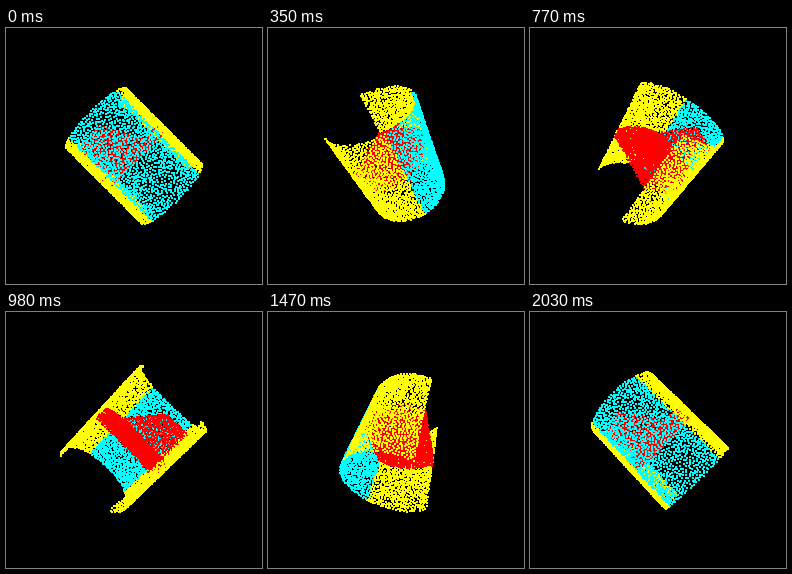
Recreate the animation shown at these times as a matplotlib script. Size 256 by 256 pixels, loop 2100 ms.

```python
import numpy as np
import matplotlib.pyplot as plt
from matplotlib.animation import FuncAnimation

SIZE, FRAMES, STEP_MS = 256, 30, 70
CAMERA = 222                        # viewing distance in pixels
WIDE, DEEP, MID = 42.5, 43, -6      # cross-section of the shell
FRONT = -33                         # depth of the open side
EDGE = np.arccos((FRONT - MID) / DEEP)
BACK = np.radians(45)
CYAN, YELLOW, RED = (0, 1, 1), (1, 1, 0), (1, 0, 0)

rng = np.random.default_rng(5)


def uniform_pair(n):
    return rng.random((2, n))


def thin_out(pts, n):
    """Keep n evenly spaced points, always taking the farthest one next."""
    keep = np.zeros(n, int)
    gap = np.full(len(pts), np.inf)
    for i in range(1, n):
        diff = pts - pts[keep[i - 1]]
        gap = np.minimum(gap, np.einsum("ij,ij->i", diff, diff))
        keep[i] = gap.argmax()
    return keep


def place(a, b, z):
    """Turn axis / across / depth into x, y, z."""
    a, b, z = np.broadcast_arrays(a, b, z)
    return np.column_stack([(a + b) / np.sqrt(2), (b - a) / np.sqrt(2), z])


def shell(n):
    u, v = uniform_pair(4 * n)
    t = (2 * u - 1) * EDGE
    half = 53.5 - 1.5 * np.cos(t)
    pts = place((2 * v - 1) * half, WIDE * np.sin(t), MID + DEEP * np.cos(t))
    keep = thin_out(pts, n)
    rgb = np.where(np.abs(t)[:, None] < BACK, CYAN, YELLOW)
    return pts[keep], rgb[keep]


def seat(n, a):
    u, v = uniform_pair(n)
    z = FRONT + 59 * v
    half = 0.95 * WIDE * np.sqrt(1 - ((z - MID) / DEEP) ** 2)
    return place(a, (2 * u - 1) * half, z)


def front_bar(n):
    u, v = uniform_pair(n)
    return place((2 * v - 1) * 5.5, (2 * u - 1) * 33, FRONT)


def slope(n):
    u, v = uniform_pair(n)[:, :, None]
    near = (1 - u) * np.array([-5, 22, -25]) + u * np.array([-5, -34, -25])
    far = (1 - u) * np.array([-42, -3, 22]) + u * np.array([-41, -33, 14])
    return place(*((1 - v) * near + v * far).T)


wall, wall_rgb = shell(3900)
red = np.vstack([seat(2800, -4), seat(2800, 4), front_bar(700), slope(1900)])
red = red[thin_out(red, 2100)]
points = np.vstack([wall, red])
colors = np.vstack([wall_rgb, np.tile(RED, (len(red), 1))]).astype(float)


def project(angle):
    x, y, z = points.T
    c, s = np.cos(angle), np.sin(angle)
    depth = z * c - x * s
    scale = CAMERA / (CAMERA - depth)
    xy = SIZE / 2 + np.column_stack([(x * c + z * s) * scale, y * scale])
    order = np.argsort(depth)
    return xy[order], colors[order]


fig = plt.figure(figsize=(SIZE / 100, SIZE / 100), dpi=100, facecolor="black")
ax = fig.add_axes([0, 0, 1, 1])
ax.set(xlim=(0, SIZE), ylim=(0, SIZE))
ax.axis("off")
xy, rgb = project(0)
dots = ax.scatter(*xy.T, s=(2 * 0.72) ** 2, c=rgb, marker="s",
                  linewidths=0, antialiased=False)


def draw(frame):
    xy, rgb = project(2 * np.pi * frame / FRAMES)
    dots.set_offsets(xy)
    dots.set_facecolor(rgb)
    return (dots,)


anim = FuncAnimation(fig, draw, frames=FRAMES, interval=STEP_MS,
                     repeat=True, repeat_delay=0)
plt.show()
```
